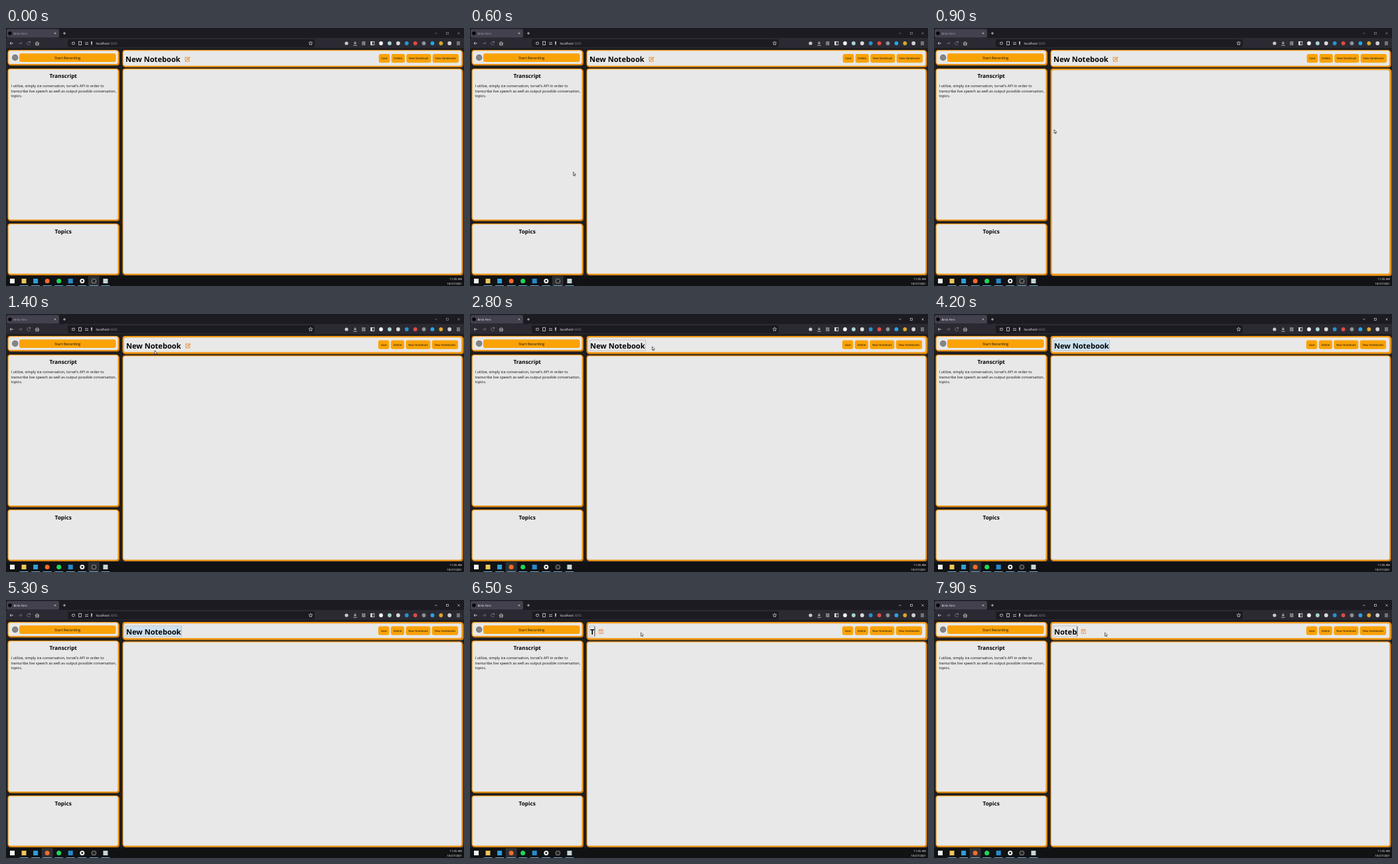
These frames come from a looping animation (690x388 px, 8000 ms). An HTML page with a canvas:

```html
<!DOCTYPE html>
<html lang="en">
<head>
<meta charset="utf-8">
<title>Notebook demo</title>
<style>
  html, body { margin: 0; width: 100%; height: 100%; overflow: hidden; background: #1f1e20; }
  canvas { display: block; width: 690px; height: 388px; }
</style>
</head>
<body>
<canvas id="stage" width="690" height="388"></canvas>
<script>
const ctx = document.getElementById('stage').getContext('2d');
const LOOP = 8000;
const FONT = '"Open Sans", "Noto Sans", sans-serif';
const ORANGE = '#faa307', BORDER = '#f39a17', SHADE = '#c87a14', PAPER = '#e8e8e8';
const EDIT_AT = 2400, SELECT_AT = 3700, CLEAR_AT = 6000, RETYPE_AT = 6800, KEY_MS = 200;

// time, x, y of the pointer tip
const pointerPath = [
  [100, 135, 371], [500, 147, 238], [900, 181, 153], [1400, 224, 55],
  [1800, 274.5, 49], [2800, 274.5, 49], [3600, 257.5, 49]
];

function pointerAt(t) {
  if (t < pointerPath[0][0]) return null;
  const next = pointerPath.findIndex(([at]) => t < at);
  if (next < 0) return pointerPath.at(-1).slice(1);
  const [t0, x0, y0] = pointerPath[next - 1], [t1, x1, y1] = pointerPath[next];
  const k = (t - t0) / (t1 - t0);
  return [x0 + (x1 - x0) * k, y0 + (y1 - y0) * k];
}

function titleAt(t) {
  if (t < CLEAR_AT) return 'New Notebook';
  if (t < RETYPE_AT) return 'T'.slice(0, Math.floor((t - CLEAR_AT) / KEY_MS));
  return 'Noteb'.slice(0, Math.floor((t - RETYPE_AT) / KEY_MS));
}

function rect(x, y, w, h, color, r = 0) {
  ctx.fillStyle = color;
  ctx.beginPath();
  ctx.roundRect(x, y, w, h, r);
  ctx.fill();
}

function circle(x, y, r, color) {
  rect(x - r, y - r, r * 2, r * 2, color, r);
}

function box(x, y, w, h, color, width = 0.8) {
  ctx.strokeStyle = color;
  ctx.lineWidth = width;
  ctx.strokeRect(x, y, w, h);
}

function trace(points, x, y) {
  ctx.beginPath();
  for (const [dx, dy] of points) ctx.lineTo(x + dx, y + dy);
}

function stroke(points, x, y, color, width = 0.8) {
  trace(points, x, y);
  ctx.strokeStyle = color;
  ctx.lineWidth = width;
  ctx.stroke();
}

function setFont(size, weight) {
  ctx.font = `${weight} ${size}px ${FONT}`;
  ctx.textRendering = 'geometricPrecision';
}

function text(str, x, y, size, color = '#0c0c0c', weight = 400, align = 'left') {
  setFont(size, weight);
  ctx.textAlign = align;
  ctx.fillStyle = color;
  ctx.fillText(str, x, y);
  return ctx.measureText(str).width;
}

function cross(x, y, r, color) {
  stroke([[-r, -r], [r, r]], x, y, color, 0.7);
  stroke([[-r, r], [r, -r]], x, y, color, 0.7);
}

function arrow(x, y, dir, color) {
  stroke([[-2.5 * dir, 0], [2.5 * dir, 0]], x, y, color);
  stroke([[0.5 * dir, -2], [2.5 * dir, 0], [0.5 * dir, 2]], x, y, color);
}

function drawTabs(focused) {
  const control = focused ? '#c8c8cc' : '#85848c';
  rect(0, 0, 690, 15, '#1c1b22');
  rect(1, 1.5, 79, 13, '#42414d', 2);
  circle(6, 8, 2.7, '#050505');
  text('Brisk Fern', 11.5, 9.6, 4.4, focused ? '#fbfbfe' : '#aaa9b0');
  cross(74, 8, 1.4, '#c8c8cc');
  stroke([[-2, 0], [2, 0]], 88, 8, '#ddd');
  stroke([[0, -2], [0, 2]], 88, 8, '#ddd');
  stroke([[-1.7, 0], [1.7, 0]], 648, 8, control, 0.7);
  box(663.5, 6.5, 3, 3, control, 0.7);
  cross(682, 8, 1.6, control);
}

function drawToolbar() {
  const light = '#ddd', y = 23;
  rect(0, 15, 690, 15, '#2b2a33');
  rect(93, 17, 372, 12, '#1c1b22', 2);
  arrow(8.5, y, -1, light);
  arrow(21.5, y, 1, '#77767e');
  ctx.beginPath();
  ctx.arc(34, y, 2.3, 0.2, 5.3);
  ctx.stroke();
  circle(36, y - 2, 0.8, light);
  stroke([[-3, 0.3], [0, -2.7], [3, 0.3]], 47, y, light);
  box(45, y, 4, 2.7, light);

  circle(101.5, y, 2.3, light);
  circle(101.5, y, 1.6, '#1c1b22');
  box(109.7, 20.3, 3.7, 5.3, light);
  for (const dy of [-1, 1.5]) stroke([[-2.5, dy], [2.5, dy]], 121.5, y, light);
  rect(128.2, 20, 1.6, 4, light, 0.8);
  stroke([[0, 0], [0, 3]], 129, y, light);
  const w = text('localhost', 135.5, 24.8, 4.8, '#fbfbfe');
  text(':3000', 135.5 + w, 24.8, 4.8, '#85848c');

  const star = Array.from({ length: 11 }, (_, i) => {
    const a = i * Math.PI / 5, r = i % 2 ? 1.4 : 3;
    return [r * Math.sin(a), -r * Math.cos(a)];
  });
  stroke(star, 459, y, light, 0.7);

  circle(513, y, 2.6, '#c9c9cd');
  stroke([[0, -3], [0, 1], [-2, -1], [0, 1], [2, -1]], 526, y, light);
  stroke([[-2.7, 3], [2.7, 3]], 526, y, light);
  for (const dx of [-2, -0.2, 1.6]) stroke([[dx, -3], [dx, 3]], 539, y, light);
  box(549.5, 20.5, 5.3, 5, light);
  rect(549.5, 20.5, 2.3, 5, light);
  ['#f4f4f4', '#a9d5d3', '#d8d8d8', '#2793cf', '#e24a45', '#8f8f96', '#22a7e0', '#d9a928', '#cfcfd2']
    .forEach((color, i) => circle(565 + i * 12.9, y, 2.9, color));
  for (const dy of [-2, 0, 2]) stroke([[-2.5, dy], [2.5, dy]], 681.5, y, light);
}

// Bright border with a darker drop edge on the right and bottom
function panel(x, y, w, h, edge = 1.3) {
  rect(x + 1, y + 1, w - 1, h - 1, SHADE, 4);
  rect(x, y, w - 1.2, h - 1.2, BORDER, 4);
  rect(x + edge, y + edge, w - 1.2 - edge * 2, h - 1.2 - edge * 2, PAPER, 3);
}

function button(label, x, y, w, h, size) {
  rect(x, y, w, h, ORANGE, 3);
  text(label, x + w / 2, y + h / 2 + size * 0.36, size, '#0c0903', 500, 'center');
}

function drawSidebar() {
  panel(2.5, 33, 168.5, 23.5);
  circle(13.7, 44.5, 4.7, '#6f6f6f');
  circle(13.7, 44.5, 4.1, '#858585');
  button('Start Recording', 20, 38.3, 145.5, 12.7, 5.45);

  panel(2.5, 61, 168.5, 229.5);
  text('Transcript', 86.2, 75.2, 8.2, '#000', 700, 'center');
  [
    "I utilize, simply ice conversation, torvel's API in order to",
    'transcribe live speech as well as output possible conversation,',
    'topics.'
  ].forEach((line, i) => text(line, 7.5, 89 + i * 7.6, 5.5));

  panel(2.5, 294, 168.5, 78);
  text('Topics', 86.2, 308.6, 8.2, '#000', 700, 'center');
}

function pencilIcon(x, y) {
  box(x + 0.5, y - 2.5, 5.7, 5.9, '#ef8d2c', 1);
  stroke([[2.4, 1.3], [7.3, -3.2]], x, y, PAPER, 3);
  stroke([[2.7, 1.2], [7.3, -3]], x, y, '#ef8d2c', 1.6);
}

function saveIcon(x, y) {
  const color = '#ef8a42';
  box(x + 0.5, y - 3, 6, 6, color);
  box(x + 2, y - 3, 2.7, 2, color);
  circle(x + 3.5, y + 1.2, 0.9, color);
}

function drawTitle(t, x, y) {
  const title = titleAt(t), typed = t >= CLEAR_AT;
  setFont(11.1, 700);
  const width = ctx.measureText(title).width;
  if (t >= SELECT_AT && !typed) rect(x - 0.3, y - 11.8, width + 1, 15.5, '#cde2f0');
  text(title, x, y, 11.1, '#000', 700);
  if (t < EDIT_AT) {
    pencilIcon(x + width + 7, y - 4);
    return;
  }
  ctx.setLineDash([1, 1]);
  box(x - 0.5, y - 12.5, width + 1.5, 16, '#777', 0.6);
  ctx.setLineDash([]);
  if (typed) {
    stroke([[0, -11.5], [0, 3]], x + width + 0.5, y, '#333');
    saveIcon(x + width + 6.5, y - 4);
  }
}

function drawNotebook(t, pointer) {
  const [px, py] = pointer ?? [0, 0];
  const grow = px > 175 && py < 60 ? 0.9 : 0;
  const bodyGrow = px > 175 && py > 61 ? 0.9 : 0;
  const top = 61 + grow * 1.4;
  panel(175.5, 33, 513.2 + grow, 26.3 + grow * 1.4, 1.3 + grow);
  panel(175.5, top, 513.2 + bodyGrow, 372 + bodyGrow - top, 1.3 + bodyGrow);
  drawTitle(t, 180 + grow, 50.6 + grow);

  let right = 682 - grow;
  for (const label of ['View Notebooks', 'New Notebook', 'Delete', 'Save']) {
    setFont(4.25, 500);
    const w = ctx.measureText(label).width + 7.4;
    button(label, right - w, 39 + grow / 2, w, 13.3, 4.25);
    right -= w + 2.4;
  }
}

function drawTaskbar(focused) {
  const slot = i => 9.5 + i * 17.55;
  rect(0, 373, 690, 15, '#111214');
  rect(slot(focused ? 3 : 7) - 8.5, 373, 17, 15, '#2e2f32');
  ['#f2f2f2', '#f0c558', '#2e9fdc', '#ee6b2f', '#1ed760', '#2789cc', '#f0f0f0', '#c9c9cb', '#c4d5dc']
    .forEach((color, i) => {
      const round = [3, 4, 6, 7].includes(i);
      rect(slot(i) - 3.5, 377, 7, 7, color, round ? 3.5 : 0);
      if (i > 0) rect(slot(i) - 6.5, 387, 13, 1, '#6fa6cf');
    });
  circle(slot(6), 380.5, 1.4, '#111214');
  circle(slot(7), 380.5, 2.9, '#29292c');
  text('11:35 AM', 687, 379.4, 4.3, '#fff', 400, 'right');
  text('10/27/2021', 687, 385.6, 4.3, '#fff', 400, 'right');
}

function drawPointer(x, y, beam) {
  if (beam) {
    stroke([[0, -3], [0, 3]], x, y, '#333', 0.7);
    return;
  }
  trace([[0, 0], [0, 5.4], [1.2, 4.3], [2, 6.1], [2.9, 5.7], [2.1, 4], [3.8, 3.8]], x, y);
  ctx.closePath();
  ctx.fillStyle = '#fff';
  ctx.fill();
  ctx.strokeStyle = '#222';
  ctx.lineWidth = 0.7;
  ctx.stroke();
}

function draw(now) {
  const t = now % LOOP;
  const focused = t >= EDIT_AT;
  const pointer = pointerAt(t);
  rect(0, 0, 690, 388, '#1f1e20');
  drawTabs(focused);
  drawToolbar();
  drawSidebar();
  drawNotebook(t, pointer);
  drawTaskbar(focused);
  if (pointer) drawPointer(...pointer, focused && t < CLEAR_AT && pointer[0] < 264);
  requestAnimationFrame(draw);
}
requestAnimationFrame(draw);
</script>
</body>
</html>
```
